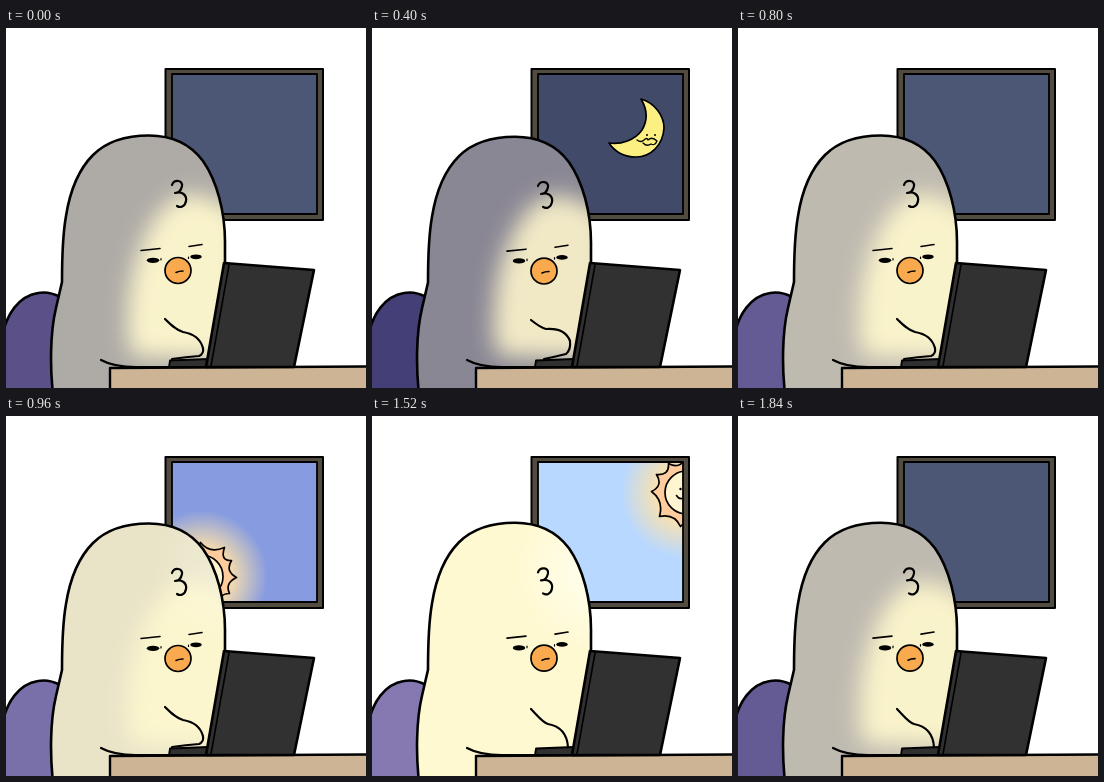
Write an HTML page that moves like this. It is 360x360 px and loops after 1.92 s.

```html
<!DOCTYPE html>
<html lang="en">
<head>
<meta charset="utf-8">
<title>Working day and night</title>
<style>
html, body { margin: 0; width: 100%; height: 100%; overflow: hidden; background: #fff; }
svg { display: block; width: 100vw; height: 100vh; }
.line { fill: none; }
</style>
</head>
<body>
<svg viewBox="0 0 360 360" stroke="#000" stroke-width="2.6" stroke-linecap="round" stroke-linejoin="round">
  <defs>
    <clipPath id="pane"><rect x="166" y="46" width="145" height="140"/></clipPath>
    <clipPath id="bodyClip"><use href="#shape"/></clipPath>
    <radialGradient id="halo">
      <stop offset=".45" stop-color="#ffe2a8" stop-opacity=".9"/>
      <stop offset=".7" stop-color="#ffe2a8" stop-opacity=".5"/>
      <stop offset="1" stop-color="#ffe2a8" stop-opacity="0"/>
    </radialGradient>
    <radialGradient id="shine">
      <stop offset="0" stop-color="#fffff0"/>
      <stop offset="1" stop-color="#fffff0" stop-opacity="0"/>
    </radialGradient>
    <filter id="soft" x="-40%" y="-40%" width="180%" height="180%"><feGaussianBlur stdDeviation="11"/></filter>
    <path id="shape" d="M47 366C44 340 44 305 50 280Q53 267 56 254C56 225 57 205 60 188C64 163 73 141 87 127C102 112 123 107.500 143 107.500C167 107.500 185 117 197 133C211 153 219 184 219 214L219 236L201 340L104 340L104 366Z"/>
  </defs>

  <rect x="159.500" y="41" width="157.500" height="151" fill="#524b40" stroke-width="2"/>
  <rect id="sky" x="166" y="46" width="145" height="140" stroke="none"/>
  <g clip-path="url(#pane)" stroke-width="1.7">
    <g id="sun">
      <circle r="66" fill="url(#halo)" stroke="none"/>
      <path id="rays" fill="#ffcc9e"/>
      <circle r="21.500" fill="#fff5d0"/>
      <path class="line" stroke-width="1.500" d="M-10 3Q-7 8-2 5Q1 2 4 5Q9 7 11 1"/>
      <g fill="#000" stroke="none"><circle cx="-6" cy="-3.500" r="1.200"/><circle cx="3" cy="-5.500" r="1.200"/></g>
    </g>
    <g id="moon">
      <path fill="#fdf083" d="M269 71C283 75 292 88 292 100C291 117 279 129 264 129C252 129 243 124 237 115C249 117 263 112 270 102C276 92 275 81 269 71Z"/>
      <path class="line" stroke-width="1.300" d="M265 112Q269 115 272 112Q275 109 276 112Q280 108 285 113Q283 118 279 116Q275 119 271 115"/>
      <g fill="#000" stroke="none"><circle cx="275" cy="107" r="1"/><circle cx="283" cy="107" r="1"/></g>
    </g>
  </g>
  <rect class="line" x="166" y="46" width="145" height="140" stroke-width="1.800"/>

  <path id="chair" d="M-4 310C0 286 13 268 32 265Q43 263 54 269L50 366L-4 366Z"/>

  <g id="bird">
    <use id="body" href="#shape" stroke="none"/>
    <g clip-path="url(#bodyClip)" stroke="none">
      <path id="glow" filter="url(#soft)" d="M170 170C145 184 124 230 122 285Q120 318 128 328L235 332L235 190C210 168 185 162 170 170Z"/>
      <circle id="sunlit" cx="225" cy="155" r="80" fill="url(#shine)"/>
    </g>
    <path class="line" d="M47 366C44 340 44 305 50 280Q53 267 56 254C56 225 57 205 60 188C64 163 73 141 87 127C102 112 123 107.500 143 107.500C167 107.500 185 117 197 133C211 153 219 184 219 214L219 238"/>
    <path class="line" stroke-width="2.200" d="M166 157C168 151 177 152 176 158C175 163 172 165 169 165C176 163 181 167 180 173C179 179 174 180 171 178"/>
    <path class="line" stroke-width="1.600" d="M135 222.500L154 220.500M183 218.500L196 216.500"/>
    <path class="line" stroke-width="1.200" d="M155 230.500V232M182.500 229V230.500"/>
    <g fill="#000" stroke="none"><ellipse cx="147" cy="232.300" rx="6.200" ry="2.600"/><ellipse cx="190" cy="228.800" rx="5.700" ry="2.400"/></g>
    <circle cx="172" cy="242.500" r="13" fill="#f9aa4e" stroke-width="1.700"/>
    <path class="line" stroke-width="1.600" d="M170 244.500Q173 243 177 243"/>
  </g>

  <path class="line" stroke-width="2.200" d="M95 332C104 337 116 339 130 339L165 339"/>
  <path d="M104 340L366 338.500V366H104Z" fill="#ccb495" stroke-width="2.400"/>
  <path d="M164 332.500L202 331V339H163Z" fill="#303030" stroke-width="1.800"/>
  <path d="M218 235L308 242L288 339H200Z" fill="#313131"/>
  <path class="line" stroke-width="1.600" d="M223 237L205 338"/>
  <path id="hand" class="line" stroke-width="2.200"/>
</svg>
<script>
const $ = id => document.getElementById(id);
const LOOP = 1920, STEP = 80, MIDNIGHT = 360;

// Distance from midnight in ms -> colour
const stops = [40, 360, 440, 600, 760];
const palette = {
  sky: ['414a69', '4c5675', '4c5675', '879ce0', 'b8d8ff'],
  body: ['8a8794', 'aeaaa6', 'bfbab0', 'e9e4c8', 'fff9d2'],
  chair: ['453f78', '5c5089', '645b94', '7a70a9', '8678b0'],
  glow: ['f1e9c6', 'f9f3cb', 'f9f3cb', 'fcf6ce', 'fff9d2']
};

// Typing cycle: hand line and how far the head sinks
const rest = ['M159 291C165 297 170 302 177 304C189 306 195 313 197 320Q198 326 193 328Q180 329 166 331', 0];
const raised = ['M159 292C164 296 169 300 174 301C188 300 195 305 198 313Q199 322 194 326Q182 329 172 331', 1.3];
const pressed = ['M159 293C165 299 170 306 176 308C187 310 195 317 196 331', -0.8];
const typing = [rest, raised, rest, pressed];

const tips = [[35, 1], [28, 17], [17, 30], [-6, 34], [-27, 24], [-35, -1], [-30, -18], [-18, -29], [-1, -34], [23, -29], [30, -16]];
$('rays').setAttribute('d', 'M' + tips[0] + tips.map(([x, y], i) => {
  const [nx, ny] = tips[(i + 1) % tips.length];
  const a = Math.atan2(y + ny, x + nx), r = 24;
  return `Q${r * Math.cos(a)} ${r * Math.sin(a)} ${nx} ${ny}`;
}).join('') + 'Z');

function shade(keys, d) {
  d = Math.min(Math.max(d, stops[0]), stops.at(-1));
  const i = Math.max(1, stops.findIndex(s => s >= d));
  const k = (d - stops[i - 1]) / (stops[i] - stops[i - 1]);
  const rgb = hex => [0, 2, 4].map(p => parseInt(hex.slice(p, p + 2), 16));
  const a = rgb(keys[i - 1]), b = rgb(keys[i]);
  return `rgb(${a.map((v, c) => Math.round(v + (b[c] - v) * k))})`;
}

// Arc across the window, s in steps from its middle
const arc = s => [246.5 + 17 * s, 106.5 - 13.5 * s + 1.5 * s * s];

function place(el, x, y, shown) {
  el.setAttribute('transform', `translate(${x} ${y})`);
  el.style.display = shown ? '' : 'none';
}

function draw(now) {
  const n = Math.floor((now % LOOP) / STEP), t = n * STEP;
  const gap = Math.abs(t - MIDNIGHT), d = Math.min(gap, LOOP - gap);
  for (const id in palette) $(id).setAttribute('fill', shade(palette[id], d));
  $('sunlit').setAttribute('opacity', Math.min(Math.max((d - 520) / 240, 0), 1));

  const [sx, sy] = arc(n - 15), [mx, my] = arc(n - 4), [ox, oy] = arc(1);
  place($('sun'), sx, sy, n > 10 && n < 23);
  place($('moon'), mx - ox, my - oy, n > 0 && n < 10);

  const [path, sink] = typing[n % 4];
  $('hand').setAttribute('d', path);
  $('bird').setAttribute('transform', `translate(0 340) scale(1 ${1 - sink / 233}) translate(0 -340)`);
}

const start = performance.now();
(function tick() {
  draw(performance.now() - start);
  requestAnimationFrame(tick);
})();
</script>
</body>
</html>
```
